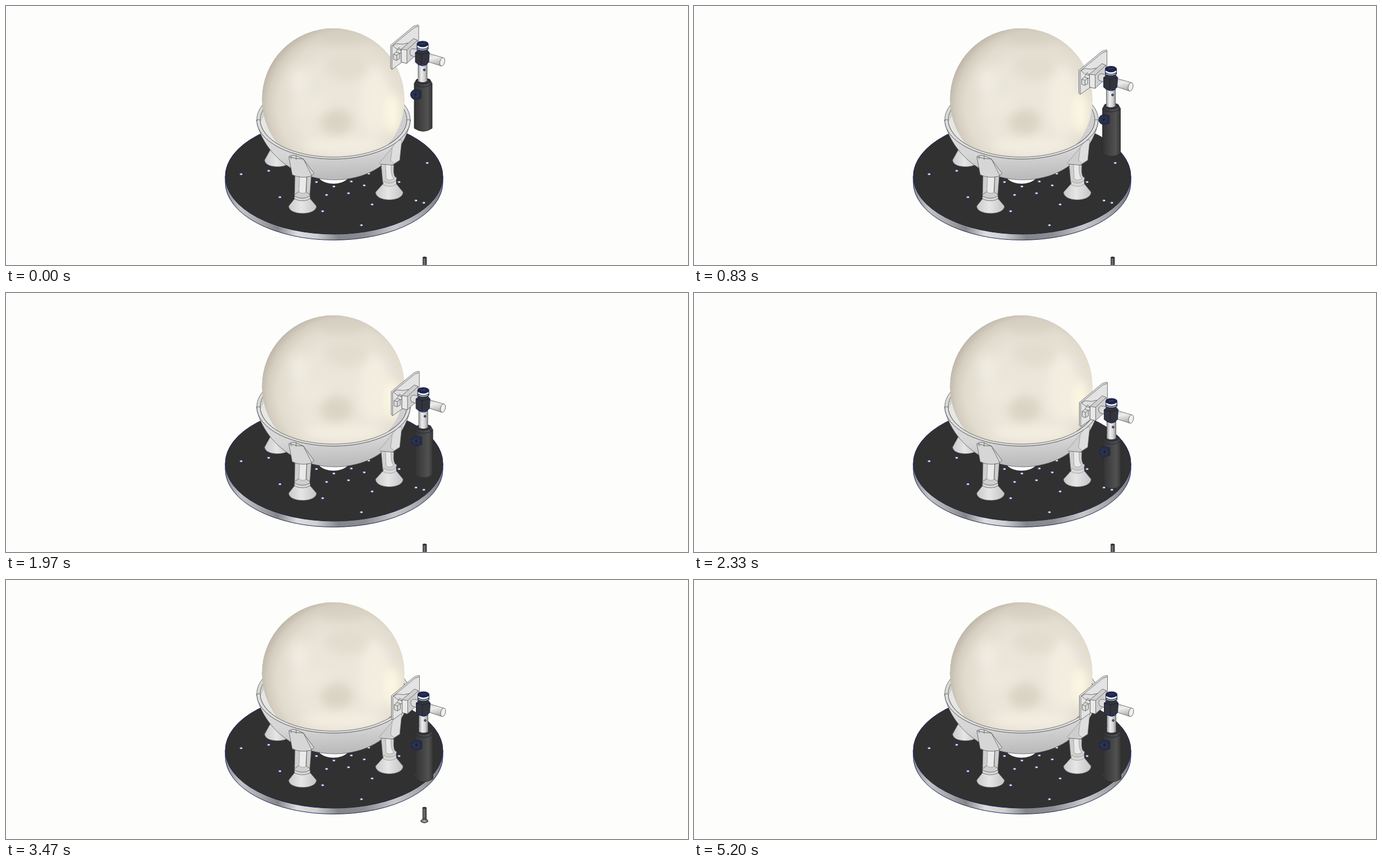
These frames come from a looping animation (1213 px wide and 462 px high, 5.23 s). An HTML page:

```html
<!DOCTYPE html>
<html lang="en">
<head>
<meta charset="utf-8">
<title>Sphere stand assembly</title>
<style>
html, body { margin: 0; width: 100%; height: 100%; overflow: hidden; background: #fdfdfc; }
svg { display: block; width: 100vw; height: 100vh; }
.ln { stroke: #555; stroke-width: .8; stroke-linejoin: round; }
.soft { stroke: #8b8b8b; stroke-width: .7; stroke-linejoin: round; }
.navy { stroke: #18245e; stroke-width: 1; }
</style>
</head>
<body>
<svg viewBox="0 0 1213 462" xmlns="http://www.w3.org/2000/svg">
<defs>
  <radialGradient id="ball" gradientUnits="userSpaceOnUse" cx="600" cy="178" r="149">
    <stop offset="0" stop-color="#ebe6da"/><stop offset=".55" stop-color="#eae5d9"/>
    <stop offset=".78" stop-color="#e2dccf"/><stop offset=".9" stop-color="#d5cec0"/>
    <stop offset="1" stop-color="#bdb6a8"/>
  </radialGradient>
  <linearGradient id="rim">
    <stop offset="0" stop-color="#8a8a8a"/><stop offset=".07" stop-color="#c4c4c4"/>
    <stop offset=".16" stop-color="#a8a8a8"/><stop offset=".24" stop-color="#858585"/>
    <stop offset=".33" stop-color="#dedede"/><stop offset=".42" stop-color="#d0d0d0"/>
    <stop offset=".52" stop-color="#858585"/><stop offset=".64" stop-color="#8e8e8e"/>
    <stop offset=".78" stop-color="#c8c8c8"/><stop offset=".9" stop-color="#a5a5a5"/>
    <stop offset="1" stop-color="#777"/>
  </linearGradient>
  <linearGradient id="bowl" x2=".12" y2="1">
    <stop offset="0" stop-color="#dcdcdc"/><stop offset=".6" stop-color="#d6d6d6"/>
    <stop offset="1" stop-color="#bcbcbc"/>
  </linearGradient>
  <linearGradient id="foot">
    <stop offset="0" stop-color="#cacaca"/><stop offset=".45" stop-color="#e6e6e6"/>
    <stop offset="1" stop-color="#c4c4c4"/>
  </linearGradient>
  <linearGradient id="post">
    <stop offset="0" stop-color="#9c9c9c"/><stop offset=".35" stop-color="#eee"/>
    <stop offset=".7" stop-color="#d2d2d2"/><stop offset="1" stop-color="#8c8c8c"/>
  </linearGradient>
  <linearGradient id="holder">
    <stop offset="0" stop-color="#323232"/><stop offset=".4" stop-color="#434343"/>
    <stop offset=".75" stop-color="#515151"/><stop offset="1" stop-color="#353535"/>
  </linearGradient>
  <linearGradient id="rod" x2=".3" y2="1">
    <stop offset="0" stop-color="#c9c9c9"/><stop offset=".45" stop-color="#eee"/>
    <stop offset="1" stop-color="#b4b4b4"/>
  </linearGradient>
  <filter id="blur" x="-60%" y="-60%" width="220%" height="220%"><feGaussianBlur stdDeviation="9"/></filter>
  <clipPath id="ballClip"><circle cx="582" cy="166.500" r="127"/></clipPath>
</defs>
<rect width="1213" height="462" fill="#fdfdfc"/>

<g id="screw">
  <path d="M741.500 448.500v20l-3.500 4.500q6.500 5 13 0l-3-4.500v-20z" fill="#4c4c4c" stroke="#2c2c2c" stroke-width=".8"/>
  <path d="M744 450v17" stroke="#8b8b8b" stroke-width="1.300"/>
  <ellipse cx="744.500" cy="448.600" rx="3.400" ry="1.500" fill="#2b2b2b"/>
  <ellipse cx="744.500" cy="472" rx="6.400" ry="3.200" fill="#74746a" stroke="#2c2c2c" stroke-width=".8"/>
  <path d="M741.500 472l6 1M744.500 470.500v3.500" stroke="#d9d8bb"/>
</g>

<g id="base">
  <path class="navy" d="M390 304v10.500a193.500 103 0 0 0 387 0V304z" fill="url(#rim)"/>
  <ellipse class="navy" cx="583.500" cy="304" rx="193.500" ry="103" fill="#313131"/>
  <g id="holes"></g>
</g>

<g id="stand">
  <path d="M558 300v9q10 8 24.500 8t24.500-8v-9z" fill="#fafafa"/>
  <path class="soft" d="M470 257l-10 18c1 8 11 11.500 23 11.500s21-4 24-10l-12-21z" fill="url(#foot)"/>
  <ellipse class="ln" cx="582.500" cy="203" rx="136.500" ry="70" fill="#d9d9d9"/>
  <ellipse class="ln" cx="582.500" cy="203" rx="130.500" ry="65.500" fill="#cfcfcf"/>
  <path d="M453 207q6 29 43 45l-20-32-15-30z" fill="#e6e6e4"/>
  <g clip-path="url(#ballClip)">
    <circle cx="582" cy="166.500" r="127" fill="url(#ball)"/>
    <g filter="url(#blur)">
      <ellipse cx="598" cy="61" rx="42" ry="9" fill="#cbc5b8" opacity=".55"/>
      <ellipse cx="606" cy="108" rx="40" ry="24" fill="#ddd7c9" opacity=".6"/>
      <ellipse cx="588" cy="207" rx="28" ry="24" fill="#d4cdbd" opacity=".7"/>
      <ellipse cx="522" cy="134" rx="17" ry="25" fill="#f2eee4" opacity=".8"/>
      <ellipse cx="545" cy="178" rx="35" ry="18" fill="#efeadf" opacity=".7"/>
      <ellipse cx="655" cy="170" rx="26" ry="58" fill="#f5f0e2" opacity=".75"/>
      <ellipse cx="600" cy="249" rx="75" ry="13" fill="#f5f0e3" opacity=".8"/>
      <ellipse cx="688" cy="192" rx="13" ry="36" fill="#fffae4" opacity=".9"/>
    </g>
  </g>
  <path class="ln" d="M446 203C448 235 490 310 585 310C675 310 716 240 719 203A136.500 70 0 0 1 446 203z" fill="url(#bowl)"/>
  <path class="ln" d="M446 203A136.500 70 0 0 0 719 203H713A130.500 66.500 0 0 1 452 203z" fill="#dedede"/>

  <path class="soft" d="M703 239l-16 13-23 28 3 3 20 1 13-9z" fill="#cecece"/>
  <path class="soft" d="M704 238q-10 3-17 14l-3 24 6 5 10-6z" fill="#dedede"/>
  <path class="ln" d="M667 282l3 33q9 8 23 1l2-10q-7 0-5-22z" fill="#cfcfcf"/>
  <path class="soft" d="M675 283l1 24q2 5 9 3l5-2q-6-5-5-24z" fill="#e9e9e9"/>
  <path class="soft" d="M671 317l-13.500 15c0 18 48.500 18 48.500 0l-13-16q-11 7-22 1z" fill="url(#foot)"/>
  <path class="soft" d="M671 312q11 8 23 0v6q-11 7-23 1z" fill="#d9d9d9"/>

  <path class="ln" d="M514 300l-1 42q13 8 27 0l3-39z" fill="#cecece"/>
  <path class="soft" d="M522 304l-1 27q4 5 12 2l2-30z" fill="#eaeaea"/>
  <path class="ln" d="M535 304l-1 28 6 4M521 331l-7 5" fill="none"/>
  <path class="soft" d="M514 343l-11 14c0 17 49 17 49 0l-12-14q-13 7-26 0z" fill="url(#foot)"/>
  <path class="ln" d="M513 339q14 8 28 0v5q-14 7-28 0z" fill="#dadada"/>
  <path class="ln" d="M503 269q5-4 13-2l13 6 19 26-7 5q-17 4-32-3z" fill="#d6d6d6"/>
  <path class="ln" d="M504 269q11 4 25 4M529 273l15 30M507 268v5M516 267v7" fill="none"/>
</g>

<g id="arm">
  <path class="ln" d="M684 70l41-34 8-2.500 1 1V79l-47.500 34-2.500-2z" fill="#e3e3e3"/>
  <path class="ln" d="M686.500 71v41.500M686.500 71l39-32 8-3" fill="none"/>
  <path class="ln" d="M688 71l6-4 12 1 9-2-4 9-7 5-10-4z" fill="#dedede"/>
  <path class="ln" d="M689 86l5-4 6 2v10l-6 3-5-2z" fill="#dadada"/>
  <path class="ln" d="M694 82l5-8 6 8-5 3M689 86l6 2v9M695 88l5-4" fill="none"/>
  <path class="ln" d="M703 77l22-19 7 3v24l-19 17-10-2z" fill="#cfcfcf"/>
  <path class="ln" d="M703 77l10 1.500v24l-10-2.500z" fill="#e8e8e8"/>
  <path class="ln" d="M713 78.500L732 61" fill="none"/>
  <path class="ln" d="M719 79q4-5 12-1v14l-11-4q-3-4-1-9z" fill="#dcdcdc"/>

  <path class="ln" d="M733 100h16v37q-8 4-16 0z" fill="url(#post)"/>
  <circle cx="744" cy="114" r="1.800" fill="#59606e" stroke="#17204a"/>
  <path d="M726 138l4-7q12-6 24 0l4 7v80q-16 11-32 0z" fill="url(#holder)" stroke="#2c2c2c" stroke-width=".8"/>
  <path d="M726 139q16 11 32 0" fill="none" stroke="#20263b"/>
  <ellipse cx="742" cy="134" rx="12" ry="5" fill="#383838" stroke="#1b203a"/>
  <path d="M733 127h16v7q-8 4-16 0z" fill="url(#post)"/>
  <path d="M728 149l11 1v15l-11 3z" fill="#2a2e3e"/>
  <circle class="navy" cx="728.500" cy="158" r="9" fill="#292e40"/>
  <path d="M724 152l8 11M733 153l-9 10M721 158h13" stroke="#2f427c"/>
  <circle cx="728.500" cy="158" r="2" fill="#151b34"/>

  <path class="ln" d="M748 83.500l29 8.500q6 7-3 15l-27-9z" fill="url(#rod)"/>
  <ellipse class="ln" cx="776" cy="99.500" rx="4.200" ry="7.700" transform="rotate(14 776 99.500)" fill="#f0f0f0"/>
  <path class="navy" d="M728 83l6-5h15l4 5-1 17-5 5h-13l-6-5z" fill="#33353b"/>
  <path d="M728 83l11 3 14-3M739 86v18" fill="none" stroke="#1a1f33"/>
  <path d="M735 104q6 5 13 0" fill="none" stroke="#18245e" stroke-width="1.300"/>
  <path class="navy" d="M731 67v10q10 6 20 0V67z" fill="#222a48"/>
  <path d="M731.500 70.500q9.500 6 19 0v3q-9.500 6-19 0z" fill="#f4f4f4"/>
  <path d="M732 76q9 5 18 0" fill="none" stroke="#e5e5e5" stroke-width="1.200"/>
  <ellipse class="navy" cx="741" cy="67" rx="9.700" ry="4.200" fill="#202641"/>
  <path d="M736 66l10 2M745 65l-8 4" stroke="#394979" stroke-width=".8"/>
</g>
</svg>
<script>
const LOOP = 5230;
const $ = id => document.getElementById(id);
const clamp = (v, lo, hi) => Math.min(hi, Math.max(lo, v));

const holes = [
  [418, 300], [467, 294], [487, 341], [570, 337], [583, 322], [552, 314],
  [614, 313], [609, 334], [637, 320], [645, 299], [563, 366], [651, 354],
  [632, 391], [699, 314], [729, 347], [743, 351], [749, 280]
];
$("holes").innerHTML = holes.map(([x, y]) =>
  `<ellipse cx="${x}" cy="${y}" rx="2.800" ry="1.700" fill="#f0f3fa" stroke="#3d5795" stroke-width=".8"/>` +
  `<path d="M${x - 2} ${y - 1}v2" stroke="#2c4380"/>`).join("");

// The arm descends first, then the screw rises until the base hides it.
function draw(t) {
  const drop = clamp(t / 2540, 0, 1);
  const rise = clamp((t - 2500) * .0436, 0, 118);
  $("arm").setAttribute("transform", `translate(${1.5 * drop} ${136.5 * drop})`);
  $("screw").setAttribute("transform", `translate(${-rise / 140} ${-rise})`);
}

function tick() {
  draw(performance.now() % LOOP);
  requestAnimationFrame(tick);
}
tick();
</script>
</body>
</html>
```
